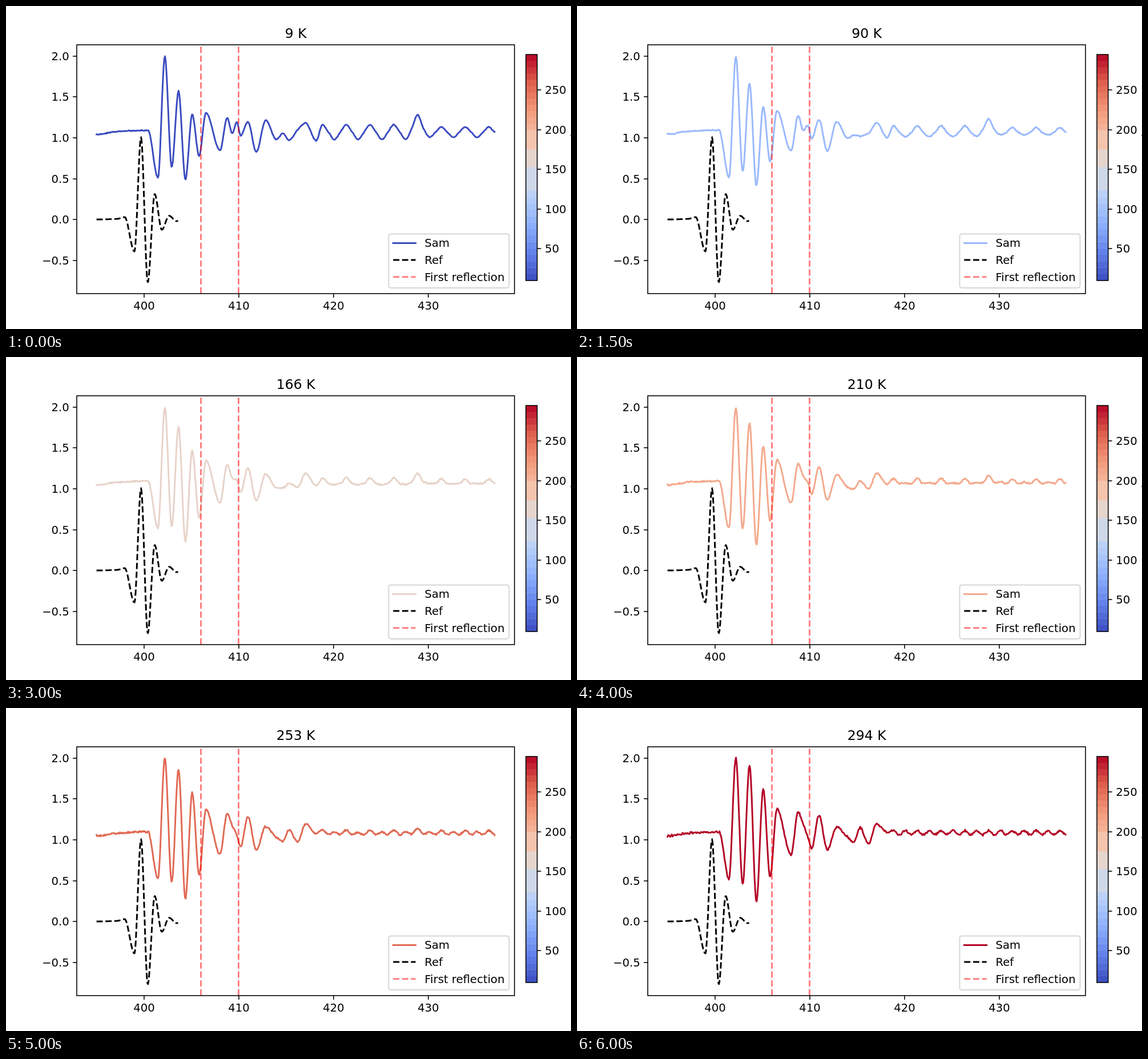
An HTML page for the animation above (6.5 s loop, 990 px wide and 566 px high).

```html
<!DOCTYPE html>
<html lang="en">
<head>
<meta charset="utf-8">
<title>Temperature sweep</title>
<style>
  html, body { margin: 0; width: 100%; height: 100%; overflow: hidden; background: #fff; }
  svg { display: block; width: 990px; height: 566px; }
  text { font: 19.64px "DejaVu Sans", sans-serif; fill: #000; }
  #title { font-size: 23.57px; }
</style>
</head>
<body>
<svg id="chart" viewBox="0 0 990 566"></svg>
<script>
const chart = document.getElementById('chart');
const TEMPS = [9, 18, 59, 90, 118, 142, 166, 188, 210, 232, 253, 274, 294];
const STEP = 500;
const LEFT = 158.6, RIGHT = 856.1, BASE = 503.7;
const THIN = 1.57, THICK = 2.95;
const DASHED = { 'stroke-dasharray': '10.9 4.71' };
const FAINT = { ...DASHED, 'stroke-opacity': 0.5 };

const mix = (a, b, t) => a + (b - a) * t;
const xAt = v => 241.7 + (v - 400) * 16.607;
const yAt = v => 374.1 - v * 143.2;

// Blue to red through grey, evenly spaced
const WARMTH = [[59,76,192], [98,130,234], [141,176,254], [184,208,249], [221,221,221],
  [245,196,173], [244,154,123], [222,96,77], [180,4,38]];

function warmth(t) {
  const p = t * (WARMTH.length - 1);
  const i = Math.min(WARMTH.length - 2, Math.floor(p));
  return `rgb(${WARMTH[i].map((c, k) => Math.round(mix(c, WARMTH[i + 1][k], p - i)))})`;
}

// Monotone cubic through [x, y] points, flat at every turning point
function curve(pts) {
  const slope = i => (pts[i + 1][1] - pts[i][1]) / (pts[i + 1][0] - pts[i][0]);
  const tangent = pts.map((_, i) => {
    if (i === 0 || i === pts.length - 1) return 0;
    const a = slope(i - 1), b = slope(i);
    return a * b <= 0 ? 0 : 2 * a * b / (a + b);
  });
  return x => {
    let i = 0;
    while (i < pts.length - 2 && x > pts[i + 1][0]) i++;
    const h = pts[i + 1][0] - pts[i][0], t = (x - pts[i][0]) / h;
    return mix(pts[i][1], pts[i + 1][1], t * t * (3 - 2 * t))
      + h * t * (1 - t) * ((1 - t) * tangent[i] - t * tangent[i + 1]);
  };
}

function random(seed) {
  return () => {
    seed = (seed * 1664525 + 1013904223) >>> 0;
    return seed / 4294967296;
  };
}

function trace(fn, from, to, step) {
  const pts = [];
  for (let x = from; x <= to; x += step) pts.push(`${x.toFixed(1)},${fn(x).toFixed(2)}`);
  return 'M' + pts.join('L');
}

// Reference pulse: swings that slowly widen and die out
const ref = [[LEFT, 374], [195, 373], [208, 370]];
[-0.39, 1, -0.765, 0.31, -0.125, 0.045, -0.02].forEach((v, k) => {
  ref.push([225 + 11.4 * k + 0.15 * k * k, yAt(v)]);
});
ref.push([302, 376.5]);

// Sample trace as [x, cold y, hot y]: lead-in, even ringing, echoes, periodic tail
const sample = [[LEFT, 225, 224], [195, 220, 219], [249, 218, 217]];
[[301, 299], [88, 88], [282, 310], [149, 100], [304, 340], [190, 142], [263, 297], [187, 177]]
  .forEach(([cold, hot], k) => sample.push([266.3 + 12 * k, cold, hot]));
sample.push([375, 253, 257], [387.5, 196, 183], [396.5, 223, 204], [404.5, 203, 226],
  [411, 227, 246], [424, 203, 188], [438.5, 256, 248], [455, 200, 209], [474, 234, 226],
  [485, 223, 235], [496, 235, 210], [511, 217, 237], [525, 205, 203], [543.5, 236, 217]);
for (let k = 0; k < 30; k++) {
  const surge = 17 * Math.exp(-((k - 16) ** 2));
  const swing = k < 18 ? 13 : 9;
  sample.push([554.5 + 10.42 * k,
    221 - swing * Math.cos(Math.PI * k / 2) - surge,
    218.5 - 3.5 * Math.cos(Math.PI * k)]);
}

const poses = TEMPS.map((temp, i) => {
  const t = (temp - 9) / 285;
  const wave = curve(sample.map(([x, cold, hot]) => [x, mix(cold, hot, t)]));
  const rand = random(71 + i * 997);
  const noise = mix(0.9, 2.2, t);
  return {
    title: temp + ' K',
    color: warmth(i < 2 ? 0 : t),
    d: trace(x => wave(x) + (rand() + rand() - 1) * noise, LEFT, RIGHT, 1.25)
  };
});

function add(tag, attrs, text) {
  const el = document.createElementNS('http://www.w3.org/2000/svg', tag);
  for (const k in attrs) el.setAttribute(k, attrs[k]);
  if (text !== undefined) el.textContent = text;
  chart.appendChild(el);
  return el;
}
const line = (d, stroke, width, more) =>
  add('path', { d, stroke, 'stroke-width': width, fill: 'none', ...more });
const label = (x, y, text, anchor = 'start') => add('text', { x, y, 'text-anchor': anchor }, text);
const frame = (x, y, width, height, more) =>
  add('rect', { x, y, width, height, fill: 'none', stroke: '#000', 'stroke-width': THIN, ...more });

// Traces
const sam = line('', '', THICK, { 'stroke-linejoin': 'round', 'stroke-linecap': 'square' });
line(trace(curve(ref), LEFT, 302, 0.5), '#000', THICK, DASHED);
for (const v of [406, 410]) {
  line(`M${Math.floor(xAt(v)) + 0.5} ${BASE}V68`, '#f00', THICK, FAINT);
}

// Axes
frame(124, 68, 767, 436);
for (let v = 400; v <= 430; v += 10) {
  const x = Math.round(xAt(v));
  line(`M${x} 504v6.9`, '#000', THIN);
  label(x, 532.4, v, 'middle');
}
for (let v = -0.5; v <= 2; v += 0.5) {
  const y = Math.round(yAt(v));
  line(`M124 ${y}h-6.9`, '#000', THIN);
  label(110.8, y + 7.2, v.toFixed(1).replace('-', '\u2212'), 'end');
}
const title = label(507.8, 56, '', 'middle');
title.id = 'title';

// Legend
frame(670.5, 399.4, 211, 94.5, { rx: 3.9, fill: '#fff', 'fill-opacity': 0.8,
  stroke: '#ccc', 'stroke-opacity': 0.8, 'stroke-width': 1.96 });
const key = line('M678.4 415.5h39.3', '', THICK, { 'stroke-linecap': 'square' });
line('M678.4 445h39.3', '#000', THICK, DASHED);
line('M678.4 474.8h39.3', '#f00', THICK, FAINT);
['Sam', 'Ref', 'First reflection'].forEach((t, i) => label(733.5, 422.4 + i * 29.7, t));

// Colour bar: fine bands at both ends, three broad ones between
const edges = [];
for (let i = 0; i < 14; i++) edges.push(481 - i * 158 / 14);
edges.push(323, 282, 251);
for (let y = 217; y >= 85; y -= 11) edges.push(y);
edges.slice(1).forEach((high, i) => {
  const low = edges[i];
  add('rect', { x: 911, y: high, width: 19.7, height: low - high + 0.3,
    fill: warmth((481 - (low + high) / 2) / 396) });
});
frame(911, 85, 19.7, 396);
for (let v = 50; v <= 250; v += 50) {
  const y = Math.round(494.7 - v * 1.389);
  line(`M930.7 ${y}h6.9`, '#000', THIN);
  label(944.3, y + 7.2, v);
}
line('M988.8 227h1.2', '#444', 1.6);

let shown;
function draw(ms) {
  const pose = poses[Math.floor(ms / STEP) % poses.length];
  if (pose === shown) return;
  shown = pose;
  title.textContent = pose.title;
  sam.setAttribute('d', pose.d);
  sam.setAttribute('stroke', pose.color);
  key.setAttribute('stroke', pose.color);
}

const start = performance.now();
function tick() {
  draw(performance.now() - start);
  requestAnimationFrame(tick);
}
tick();
</script>
</body>
</html>
```
